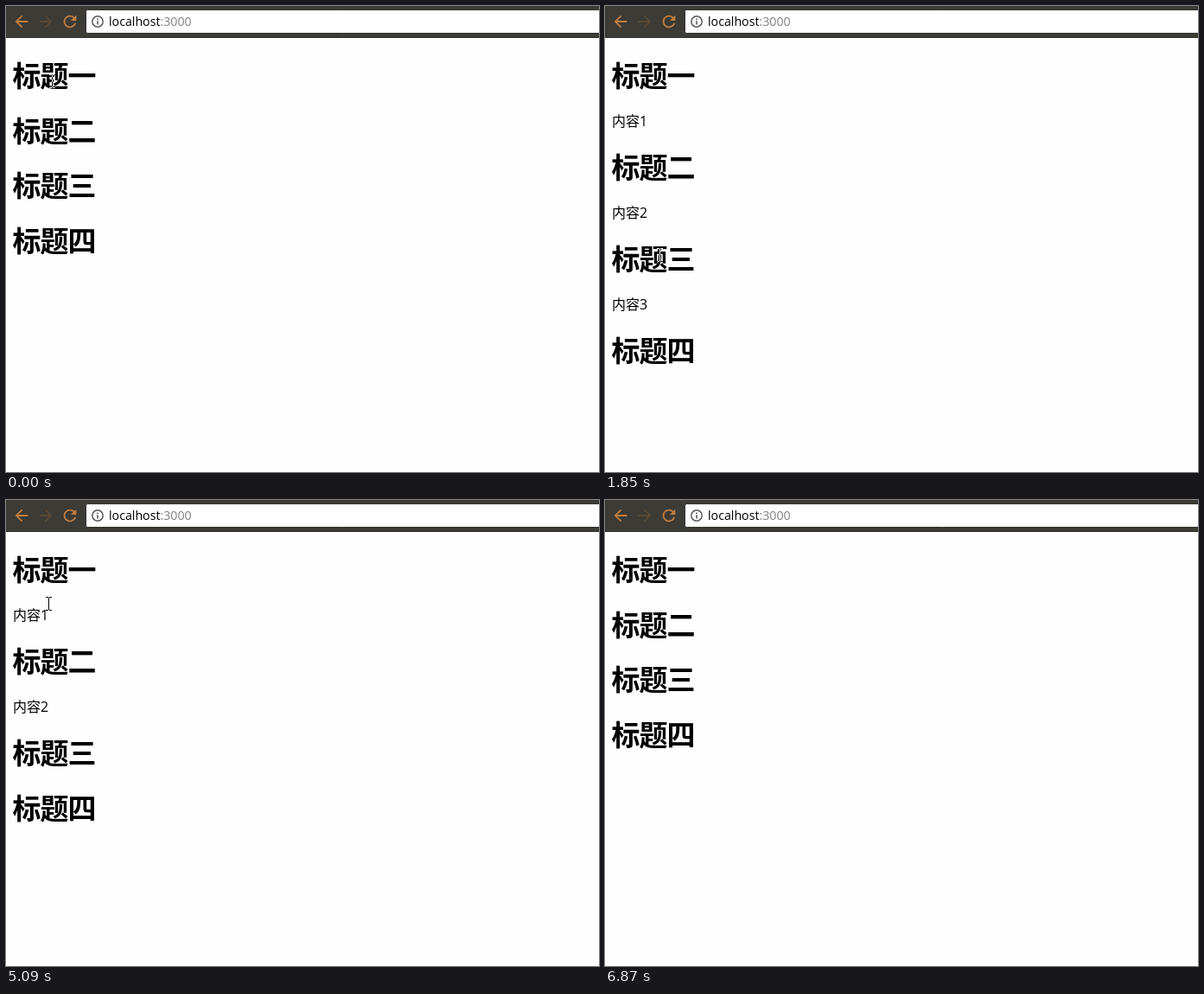
Write an HTML page with a canvas that moves like this. It is 686x539 px and loops after 7.27 s.

```html
<!DOCTYPE html>
<html lang="zh-CN">
<head>
<meta charset="utf-8">
<title>标题</title>
<style>
html, body { margin: 0; width: 100%; height: 100%; overflow: hidden; background: #fefefe; }
canvas { display: block; }
</style>
</head>
<body>
<canvas id="stage" width="686" height="539"></canvas>
<script>
const ctx = document.getElementById('stage').getContext('2d', { alpha: false });
const LOOP = 7270;
const STEP = 125;
const HEADING = 'bold 33px "Noto Sans CJK SC", "Noto Sans CJK", sans-serif';
const BODY = '16px "Open Sans", "Noto Sans CJK SC", "Noto Sans CJK", sans-serif';
const URL_FONT = '14.2px "Open Sans", "Noto Sans", sans-serif';
const ACCENT = '#c17d40';
const EDGE = '#33322d';

// Accordion sections with the times at which each is shown
const sections = [
  { name: '一', open: 120, close: 5360 },
  { name: '二', open: 1070, close: 6210 },
  { name: '三', open: 1850, close: 4270 },
  { name: '四', open: 2390, close: 3570 }
];

// Pointer moves: each reaches (x, y) at its end time in a few even steps
const start = { x: 53, y: 87 };
const moves = [
  { end: 760, steps: 4, x: 53, y: 176 },
  { end: 1580, steps: 5, x: 63, y: 288 },
  { end: 2510, steps: 5, x: 62, y: 395 },
  { end: 3570, steps: 1, x: 62, y: 373 },
  { end: 3990, steps: 3, x: 62, y: 287 },
  { end: 4690, steps: 3, x: 49, y: 136 },
  { end: 5360, steps: 5, x: 48, y: 97 },
  { end: 6050, steps: 4, x: 55, y: 142 },
  { end: 6600, steps: 3, x: 549, y: 512 },
  { end: 6870, steps: 2, x: 640, y: 560 }
];

const arrow = new Path2D('M20 11H7.83l5.59-5.59L12 4l-8 8 8 8 1.41-1.41L7.83 13H20v-2z');
const reload = new Path2D('M17.65 6.35C16.2 4.9 14.21 4 12 4c-4.42 0-7.99 3.58-7.99 8s3.57 8 7.99 8c3.73 0 6.84-2.55 7.73-6h-2.08c-.82 2.33-3.04 4-5.65 4-3.31 0-6-2.69-6-6s2.69-6 6-6c1.66 0 3.14.69 4.22 1.78L13 11h7V4l-2.35 2.35z');

function rect(x, y, w, h, color) {
  ctx.fillStyle = color;
  ctx.fillRect(x, y, w, h);
}

function text(str, x, y, font, color = '#000', spacing = 0) {
  ctx.font = font;
  ctx.letterSpacing = spacing + 'px';
  ctx.fillStyle = color;
  ctx.fillText(str, x, y);
}

function icon(path, x, y, color, flip = 1) {
  ctx.save();
  ctx.translate(x, y);
  ctx.scale(0.92 * flip, 0.92);
  ctx.translate(-12, -12);
  ctx.fillStyle = color;
  ctx.fill(path);
  ctx.restore();
}

function drawToolbar() {
  rect(0, 0, 686, 37, '#3c3b35');
  rect(0, 36, 686, 1, EDGE);
  icon(arrow, 18, 18, ACCENT);
  icon(arrow, 46, 18, '#594935', -1);
  icon(reload, 74, 18, ACCENT);

  ctx.beginPath();
  ctx.roundRect(92.5, 4.5, 600, 27, 2);
  ctx.fillStyle = '#fff';
  ctx.fill();
  ctx.strokeStyle = EDGE;
  ctx.lineWidth = 1;
  ctx.stroke();

  ctx.strokeStyle = '#5a5a5a';
  ctx.lineWidth = 1.5;
  ctx.beginPath();
  ctx.arc(106, 18, 6.2, 0, Math.PI * 2);
  ctx.stroke();
  rect(105.2, 14.5, 1.6, 1.7, '#5a5a5a');
  rect(105.2, 17.3, 1.6, 4.2, '#5a5a5a');

  text('localhost', 119, 23, URL_FONT);
  text(':3000', 119 + ctx.measureText('localhost').width, 23, URL_FONT, '#808080');
}

function drawSections(t) {
  let y = 93;
  sections.forEach((s, i) => {
    text('标题' + s.name, 7.5, Math.round(y), HEADING, '#000', -1);
    if (t >= s.open && t < s.close) {
      text('内容' + (i + 1), 8, Math.round(y + 46), BODY);
      y += 42.4;
    }
    y += 63.6;
  });
}

function pointerAt(t) {
  let { x, y } = start;
  for (const m of moves) {
    const done = Math.floor((t - m.end) / STEP) + m.steps;
    const k = Math.min(Math.max(done / m.steps, 0), 1);
    x += (m.x - x) * k;
    y += (m.y - y) * k;
  }
  return [Math.round(x), Math.round(y)];
}

// Inverting I-beam
function drawPointer(t) {
  const [x, y] = pointerAt(t);
  ctx.globalCompositeOperation = 'difference';
  for (const edge of [y - 8, y + 7]) {
    rect(x - 3, edge, 3, 1, '#fff');
    rect(x + 1, edge, 3, 1, '#fff');
  }
  rect(x, y - 7, 1, 14, '#fff');
  ctx.globalCompositeOperation = 'source-over';
}

function draw(now) {
  const t = now % LOOP;
  rect(0, 0, 686, 539, '#fefefe');
  drawToolbar();
  drawSections(t);
  drawPointer(t);
}

function loop() {
  draw(performance.now());
  requestAnimationFrame(loop);
}
loop();
</script>
</body>
</html>
```
